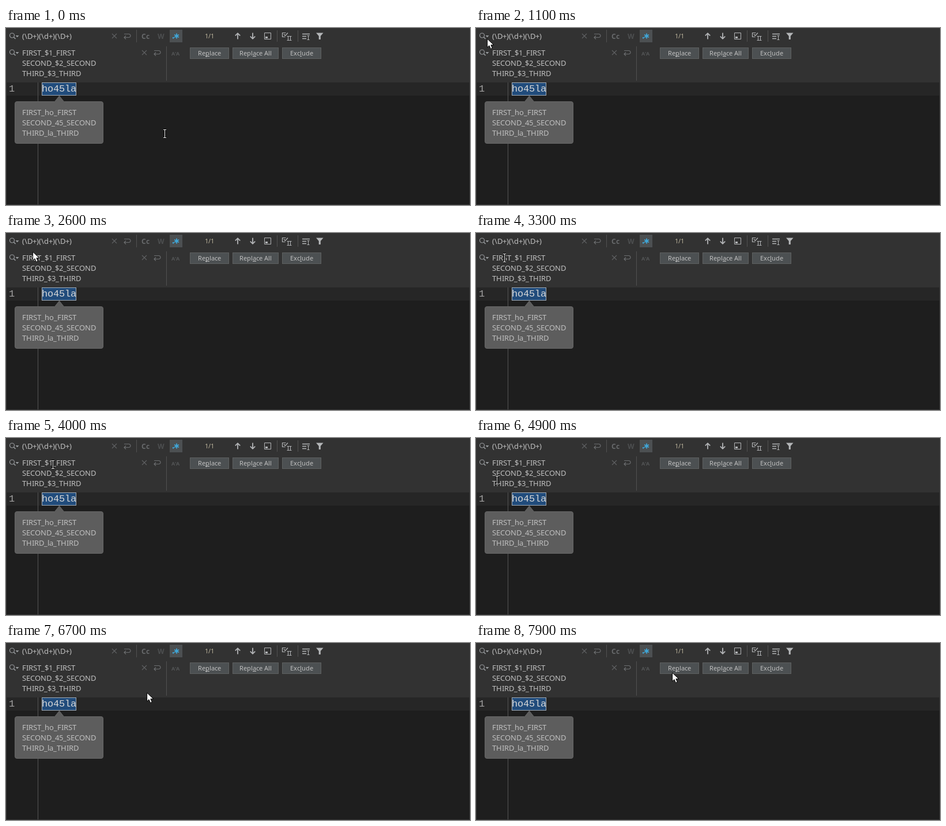
Recreate the animation shown at these times as an HTML page. Size 805 by 309 pixels, loop 8 s.

```html
<!DOCTYPE html>
<html lang="en">
<head>
<meta charset="utf-8">
<title>Regex replace preview</title>
<style>
  html, body { margin: 0; width: 100%; height: 100%; overflow: hidden; background: #1e1e1e; }
  svg { display: block; width: 805px; height: 309px; }
  text { white-space: pre; font-kerning: none; }
  .line { fill: none; stroke-width: 1; }
</style>
</head>
<body>
<svg viewBox="0 0 805 309" xmlns="http://www.w3.org/2000/svg">
  <defs>
    <g id="lens" fill="none" stroke="#9a9da0">
      <circle cx="10.5" cy="13" r="4" stroke-width="1.2"/>
      <path d="M13.4 16 L16.5 19" stroke-width="1.6"/>
      <path d="M16.5 13 h6 l-3 3.2 z" fill="#9a9da0" stroke="none"/>
    </g>
    <path id="cross" d="M-4 -4 L4 4 M4 -4 L-4 4" fill="none" stroke="#606264" stroke-width="1.1"/>
    <path id="enter" d="M-5 -3.5 H3 A3 3 0 0 1 3 2.5 H-4.5 M-2 -.5 L-5 2.5 L-2 5.5" fill="none" stroke="#6c6e70" stroke-width="1.2"/>
    <path id="up" d="M0 5.5 V-4.5 M-4.2 -.6 L0 -4.8 L4.2 -.6" fill="none" stroke="#b4b6b8" stroke-width="1.8"/>
    <path id="bar" d="M-2 0 H2 M0 0 V7 M-2 7 H2" fill="none" stroke="#b4b6b8"/>
    <path id="arm" d="M0 -4.5 V4.5" stroke="#3fa9dc" stroke-width="1.8"/>
  </defs>

  <!-- panels -->
  <rect width="805" height="95" fill="#323232"/>
  <rect y="95" width="805" height="23" fill="#262626"/>
  <path class="line" d="M55.5 95 V309" stroke="#555"/>
  <path class="line" d="M.5 95 V308.5 H804.5 V95" stroke="#353535"/>
  <path class="line" d="M226.5 3 V25 M278.5 32 V92 M470.5 4 V24 M506.5 4 V24" stroke="#515151"/>

  <!-- toolbar icons -->
  <use href="#lens"/>
  <use href="#lens" y="29"/>
  <use href="#cross" x="188" y="14"/>
  <use href="#cross" x="240" y="43"/>
  <use href="#enter" x="210" y="14"/>
  <use href="#enter" x="262" y="43"/>
  <rect x="284" y="3" width="22" height="22" fill="#4c5052"/>
  <rect x="289" y="16" width="2.4" height="2.4" fill="#3fa9dc"/>
  <g transform="translate(296 14)">
    <use href="#arm"/>
    <use href="#arm" transform="rotate(60)"/>
    <use href="#arm" transform="rotate(120)"/>
  </g>
  <use href="#up" x="402" y="14"/>
  <use href="#up" transform="translate(428 14) rotate(180)"/>
  <g fill="none" stroke="#b4b6b8">
    <path d="M448.5 8.5 h11 v11 h-11 z"/>
    <path d="M450 15 h4 v3 h-4 z" fill="#b4b6b8" stroke="none"/>
    <path d="M485.5 8.5 h-6 v7 h5 M482 11 l2.5 2.5 l4.5 -5" stroke-width="1.2"/>
    <use href="#bar" x="489.5" y="14.5"/>
    <use href="#bar" x="493.5" y="14.5"/>
    <path d="M514 10.5 h13 M514 14.5 h7 M514 18.5 h7" stroke-width="1.3"/>
    <use href="#bar" x="524.5" y="13.5"/>
    <path d="M538 8.5 h12.5 l-4.7 5.5 v6 h-3.1 v-6 z" fill="#b4b6b8" stroke="none"/>
  </g>

  <!-- match and preview balloon -->
  <rect x="62.5" y="95.5" width="59" height="22" fill="#214c7c" stroke="#a3adb8"/>
  <path d="M19 128.5 H84.5 L92.5 118.5 L100.5 128.5 H165 a3.5 3.5 0 0 1 3.5 3.5 V198 a3.5 3.5 0 0 1 -3.5 3.5 H19 a3.5 3.5 0 0 1 -3.5 -3.5 V132 a3.5 3.5 0 0 1 3.5 -3.5 z" fill="#5d5d5d" stroke="#676767"/>

  <g id="labels"></g>

  <g id="beam" fill="none">
    <path d="M1 1.5 H6 M3.5 1.5 V15.5 M1 15.5 H6" stroke="#000" stroke-width="3"/>
    <path d="M1 1.5 H6 M3.5 1.5 V15.5 M1 15.5 H6" stroke="#fff"/>
  </g>
  <path id="arrow" d="M.6 1 V15.8 L4 12.7 L6.5 18.4 L9.3 17.2 L6.9 11.7 H11.8 Z" fill="#fff" stroke="#000"/>
</svg>

<script>
const $ = id => document.getElementById(id);
const pen = document.createElement('canvas').getContext('2d');

const UI = '"Noto Sans", sans-serif';
const MONO = '"Liberation Mono", monospace';

function add(tag, attrs) {
  const el = document.createElementNS('http://www.w3.org/2000/svg', tag);
  for (const key in attrs) el.setAttribute(key, attrs[key]);
  return $('labels').appendChild(el);
}

// Letter widths, rounded to whole pixels
function advances(str, size, font = UI, weight = 400) {
  pen.font = `${weight} ${size}px ${font}`;
  return [...str].map(ch => Math.round(pen.measureText(ch).width));
}

// `mark` underlines one letter
function label(str, x, y, { size = 13, fill = '#c0c0c0', font = UI, weight = 400, mark = -1 } = {}) {
  const xs = advances(str, size, font, weight).map((w, i) => {
    if (i === mark) add('rect', { x, y: y + 1, width: w, height: 1, fill });
    x += w;
    return x - w;
  });
  add('text', {
    x: xs.join(' '), y, fill,
    'font-size': size, 'font-family': font, 'font-weight': weight
  }).textContent = str;
}

function button(str, x, width, mark) {
  const textWidth = advances(str, 11).reduce((sum, w) => sum + w);
  add('rect', { x: x + .5, y: 34.5, width: width - 1, height: 19, fill: '#4c5052', stroke: '#5e6060' });
  label(str, x + Math.round((width - textWidth) / 2), 48, { size: 11, mark });
}

// Three rows, used for both the template and its preview
function rows(values, y) {
  ['FIRST', 'SECOND', 'THIRD'].forEach((word, i) =>
    label(`${word}_${values[i]}_${word}`, 28, y + 18 * i));
}

label('(\\D+)(\\d+)(\\D+)', 28, 19);
rows(['$1', '$2', '$3'], 48);
rows(['ho', '45', 'la'], 152);
label('Cc', 235, 19, { size: 12, weight: 700, fill: '#686a6c' });
label('W', 263, 19, { size: 12, weight: 700, fill: '#4d4f50' });
label('1/1', 345, 18, { size: 11, fill: '#b9b19a' });
label("A'A", 287, 48, { size: 9, weight: 700, fill: '#555758' });
button('Replace', 319, 68, 2);
button('Replace All', 393, 80, 4);
button('Exclude', 479, 68, 3);
label('1', 5, 111, { size: 17, font: MONO, fill: '#a4a3a3' });
label('ho45la', 62, 111, { size: 17, font: MONO, fill: '#d6d6d6' });

// Pointer path: straight moves and rests, counted in ticks
const TICK = 100, LOOP = 8000;
const steps = [[275, 184]];

const pointer = {
  go(x, y, ticks) {
    const [x0, y0] = steps[steps.length - 1];
    for (let i = 1; i <= ticks; i++) {
      const k = i / ticks;
      steps.push([Math.round(x0 + (x - x0) * k), Math.round(y0 + (y - y0) * k)]);
    }
    return this;
  },
  rest(ticks) {
    return this.go(...steps[steps.length - 1], ticks);
  }
};

pointer
  .go(33, 36, 7).go(40, 27, 2).go(19, 18, 2).rest(1)   // to the search field
  .go(120, 20, 9).go(54, 31, 3).rest(1)                // along the pattern
  .go(46, 32, 1).go(29, 42, 5).rest(1)
  .go(147, 50, 6).go(48, 44, 3)                        // first row
  .go(164, 66, 5).go(36, 73, 3)                        // second row
  .go(28, 85, 1).go(130, 100, 4)                       // third row
  .go(120, 124, 1).rest(1)
  .go(112, 170, 2).go(188, 119, 3).rest(4)             // over the balloon
  .go(244, 86, 2).rest(5)
  .go(339, 51, 5).rest(1).go(340, 51, 1);              // to the button

const inside = (x, y, l, t, r, b) => x >= l && x < r && y >= t && y < b;

const overText = (x, y) =>
  inside(x, y, 28, 0, 170, 24) ||
  inside(x, y, 25, 36, 225, 88) ||
  (y >= 95 && !inside(x, y, 15, 128, 169, 202));

function place(el, x, y, shown) {
  el.setAttribute('transform', `translate(${x} ${y})`);
  el.setAttribute('visibility', shown ? 'visible' : 'hidden');
}

const start = performance.now();
function draw() {
  const t = (performance.now() - start) % LOOP;
  const [x, y] = steps[Math.floor(t / TICK)];
  const text = overText(x, y);
  place($('beam'), x - 3, y - 8, text);
  place($('arrow'), x, y, !text);
  requestAnimationFrame(draw);
}
draw();
</script>
</body>
</html>
```
